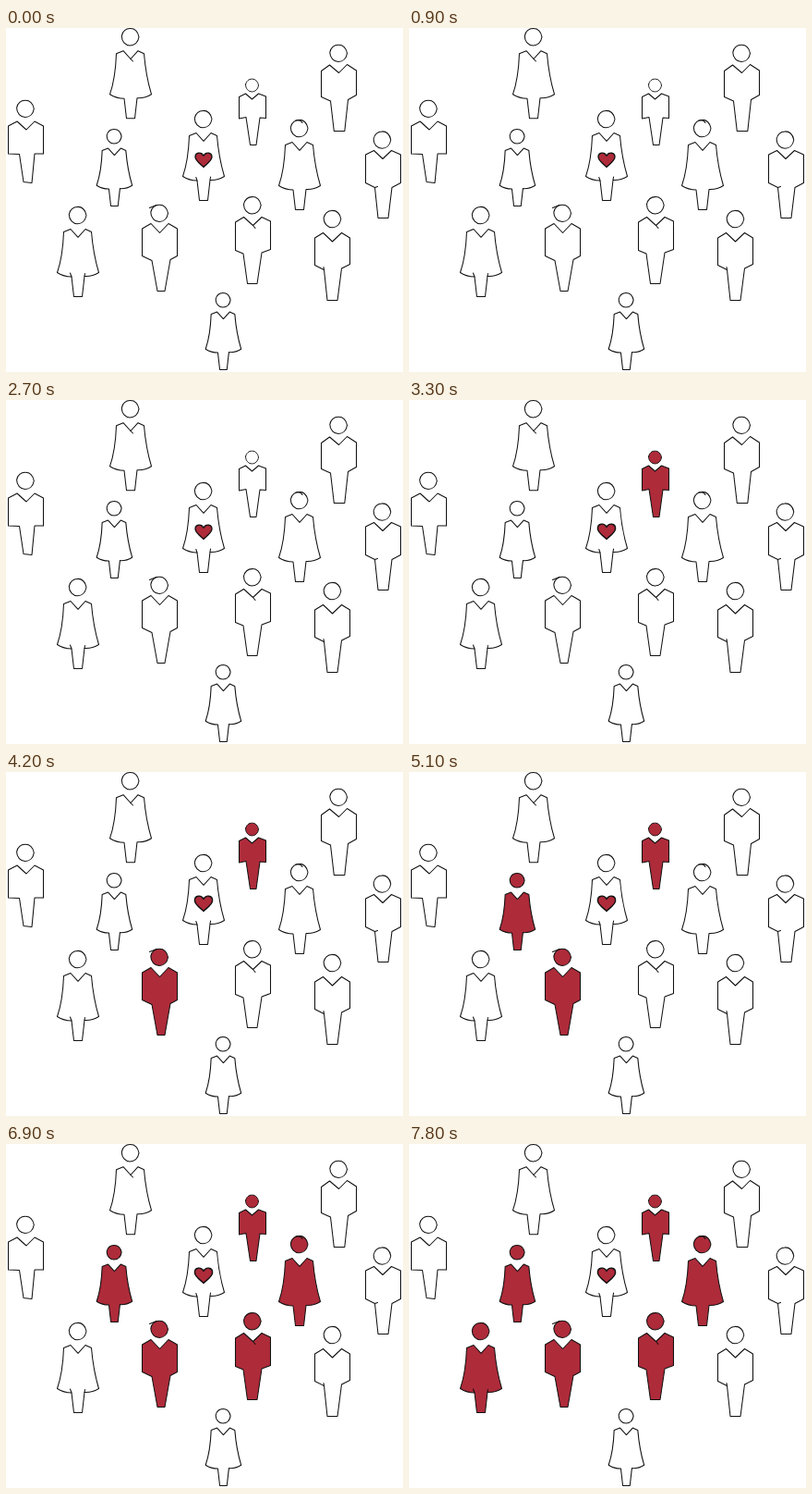
An HTML page that plays this animation: 430 by 372 pixels, repeating every 8000 ms.

```html
<!DOCTYPE html>
<html lang="en">
<head>
<meta charset="utf-8">
<title>Spreading heart</title>
<style>
  html, body { margin: 0; width: 100%; height: 100%; overflow: hidden; background: #fff; }
  svg { display: block; width: 430px; height: 372px; }
  .crowd { fill: #fff; stroke: #111; stroke-width: 1.05; stroke-linejoin: round; stroke-linecap: round; }
  .crowd .small { stroke-width: 1.25; }
  .crowd .on { fill: #ae2b3a; }
  .tick { fill: none; }
  #heart { fill: #ae2b3a; stroke: #111; stroke-width: 1.5; stroke-linejoin: round; }
</style>
</head>
<body>
<svg viewBox="0 0 430 372">
  <defs>
    <path id="head" d="M-9.2-1C-8-6.5-4.5-9.1 0-9.1C5.5-9.2 8.5-5 9.5 0C8.5 6 4.5 9.2 0 9.2C-5 9.2-9.2 5-9.2-1Z"/>
    <g id="woman">
      <use href="#head"/>
      <path d="M-15 18L-7.5 15 .5 23.8 8.5 15 15 18Q17 42 23 62Q16 66.5 7.5 66L5 88H-4L-6.5 66.5Q-15 66.5-22 62Q-16 45-15 18Z"/>
    </g>
  </defs>

  <g class="crowd">
    <!-- women -->
    <use href="#woman" x="134.5" y="9.7"/>
    <path class="tick" d="M135 33.5L137.5 36"/>
    <use href="#woman" x="213.5" y="98.5"/>
    <path class="tick" d="M207 165L205.8 161.5M221 164L221.6 161"/>
    <use href="#woman" id="p3" x="317.5" y="108.5"/>
    <path class="tick" d="M314 100Q319 99 321 102.5"/>
    <use href="#woman" id="p5" x="77.5" y="202.5"/>
    <path class="tick" d="M71 269L69.5 265M85 268.5L85.5 265.5"/>
    <use href="#woman" class="small" id="p2" transform="translate(117 117.2) scale(.855)"/>
    <use href="#woman" class="small" transform="translate(235 294.2) scale(.855)"/>

    <!-- men -->
    <g>
      <use href="#head" x="360" y="27.3"/>
      <path d="M341.5 46.5L350.5 40 360.5 48.5 369.5 39.5 379.5 46V72.5L370.5 77.5 366.8 111.5H355.3L351.5 79 341.5 74.5Z"/>
    </g>
    <g>
      <use href="#head" x="20.8" y="87.3"/>
      <path d="M2.5 106L12 101 22 110 31 101 40.5 106V136H31L28 167.5 19 166.5 14.5 136.5 2.5 136Z"/>
    </g>
    <g>
      <use href="#head" x="407.3" y="121"/>
      <path d="M389.5 137L398.5 132.5 408 141.5 417.5 132.5 427.5 137V167.5L418 172.5 414 205.5H403L399.5 172.5 389.5 167.5Z"/>
      <path class="tick" d="M399.5 172.5L402.5 171.5"/>
    </g>
    <g id="p1">
      <use href="#head" x="166" y="200.3"/>
      <path d="M147.5 217L157 211.5 166.5 221.5 176 211.5 185.5 217V246.5L178 250.5 172 284.5H164L158 251.5 147.5 246.5Z"/>
      <path class="tick" d="M155.5 194.5L163 191.5"/>
    </g>
    <g id="p4">
      <use href="#head" x="266.7" y="191.7"/>
      <path d="M248.5 210L257.5 204.5 267.5 213.5 277 204.5 286.5 209V239.5L277 243 272 276.5H261.5L257 244 248.5 240.5Z"/>
      <path class="tick" d="M267.5 213.5L270 216.5"/>
    </g>
    <g>
      <use href="#head" x="353.3" y="206.5"/>
      <path d="M334.5 227L343.5 221.5 353.5 231 363.5 221.5 372.5 227V255.5L363.5 260 359 294.5H348L344.5 261.5 334.5 256.5Z"/>
      <path class="tick" d="M344.5 261.5L344 258.5"/>
    </g>
    <g id="p0">
      <use href="#head" class="small" transform="translate(266.4 62) scale(.75)"/>
      <path d="M252.5 74.5L259.5 71 266.5 77 273.5 71 281.5 74V97.5L275 97 271 126.5H264.5L260 96.5 252.5 98Z"/>
    </g>
  </g>

  <!-- drawn up from its tip, which stays in place while it beats -->
  <path id="heart" d="M0 0C-3-3-10-7.5-10-12C-10-18-2.5-18.5 0-13.5C2.5-18.5 10-18 10-12C10-7.5 3-3 0 0Z"/>
</svg>

<script>
  const LOOP = 8000, STEP = 300;
  const BEAT = [0.9, 1, 0.96];
  const FIRST = 11;   // step at which the first person turns red
  const heart = document.getElementById('heart');
  const people = [0, 1, 2, 3, 4, 5].map(i => document.getElementById('p' + i));

  // One more person joins on every third step, once per heartbeat.
  function draw(now) {
    const step = Math.floor((now % LOOP) / STEP);
    heart.setAttribute('transform', `translate(214 150.4) scale(${BEAT[step % 3]})`);
    people.forEach((p, i) => p.classList.toggle('on', step >= FIRST + i * 3));
  }

  const start = performance.now();
  function tick() {
    draw(performance.now() - start);
    requestAnimationFrame(tick);
  }
  tick();
</script>
</body>
</html>
```
